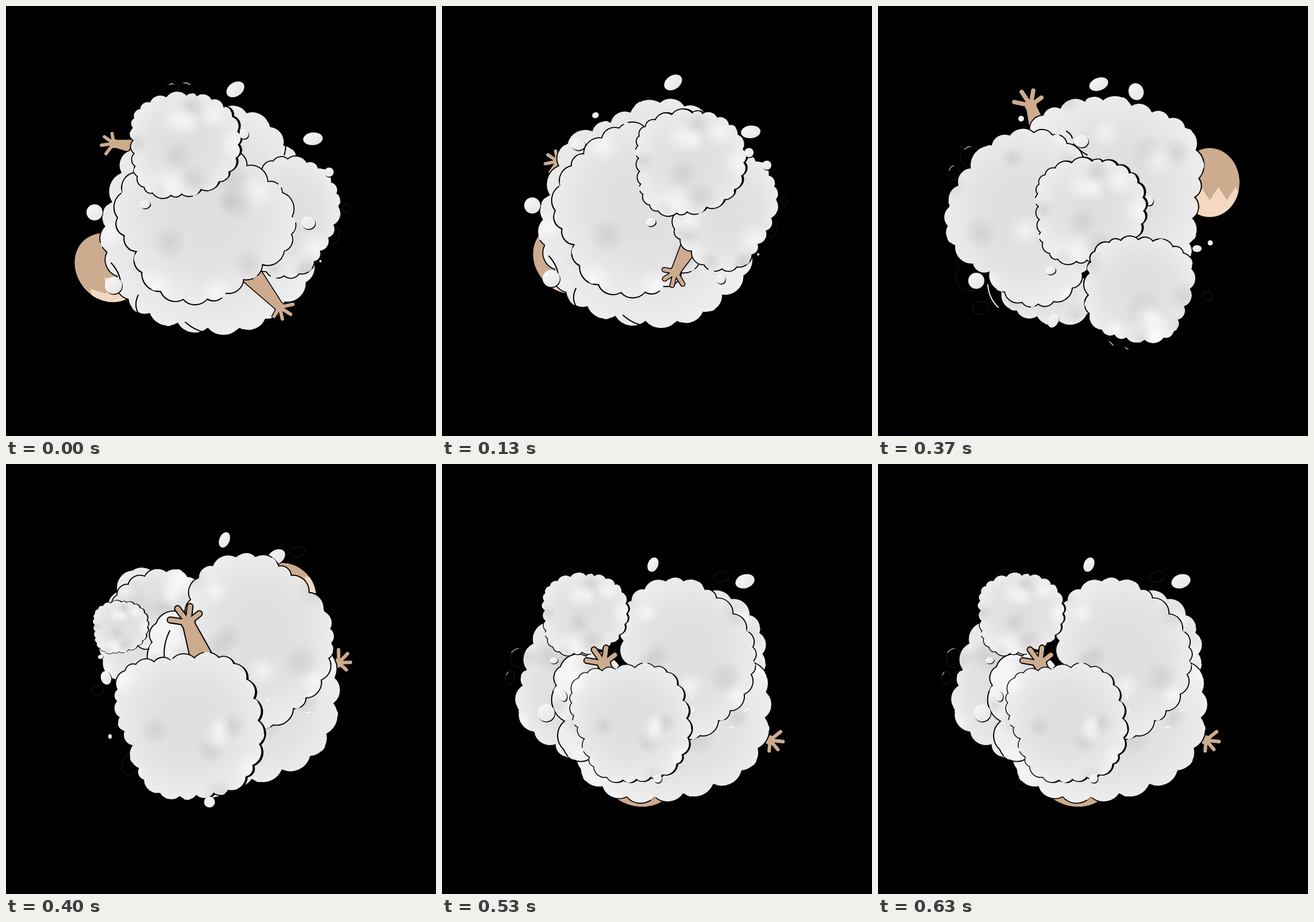
These frames come from a looping animation (748x748 px, 660 ms). An HTML page:

```html
<!DOCTYPE html>
<html lang="en">
<head>
<meta charset="utf-8">
<title>Dust cloud scuffle</title>
<style>
html, body { margin: 0; width: 100%; height: 100%; overflow: hidden; background: #000; }
svg { display: block; width: 100%; height: 100%; }
</style>
</head>
<body>
<svg id="stage" viewBox="0 0 748 748">
  <defs>
    <radialGradient id="puff" cx=".5" cy=".48" r=".62">
      <stop offset="0" stop-color="#dedede"/>
      <stop offset=".5" stop-color="#e2e2e2"/>
      <stop offset=".85" stop-color="#eee"/>
      <stop offset="1" stop-color="#f8f8f8"/>
    </radialGradient>
    <linearGradient id="ball" x2="1" y2="1">
      <stop offset="0" stop-color="#f8f8f8"/>
      <stop offset="1" stop-color="#e4e4e4"/>
    </linearGradient>
    <radialGradient id="dark">
      <stop offset="0" stop-color="#b8b8b8" stop-opacity=".4"/>
      <stop offset="1" stop-color="#b8b8b8" stop-opacity="0"/>
    </radialGradient>
    <radialGradient id="light">
      <stop offset="0" stop-color="#fff" stop-opacity=".6"/>
      <stop offset="1" stop-color="#fff" stop-opacity="0"/>
    </radialGradient>
    <clipPath id="skull"><ellipse rx="52" ry="60"/></clipPath>
  </defs>
</svg>
<script>
const stage = document.getElementById('stage');
const defs = stage.querySelector('defs');
const LOOP = 660;
const SKIN = '#ccab8f', PALE = '#f4d8c2';
const poses = [];

function seeded(seed) {
  let s = seed * 7919 + 17;
  return (lo, hi) => {
    s = (s * 16807) % 2147483647;
    return lo + (hi - lo) * s / 2147483647;
  };
}

// Closed Catmull-Rom curve through the key points.
function loopCurve(keys, fine = 24) {
  const at = i => keys[(i + keys.length) % keys.length];
  const out = [];
  keys.forEach((_, i) => {
    const [a, b, c, d] = [at(i - 1), at(i), at(i + 1), at(i + 2)];
    for (let j = 0; j < fine; j++) {
      const u = j / fine;
      out.push([0, 1].map(n => b[n] + 0.5 * u * (c[n] - a[n]
        + u * (2 * a[n] - 5 * b[n] + 4 * c[n] - d[n] + u * (3 * (b[n] - c[n]) + d[n] - a[n])))));
    }
  });
  return out;
}

// Arcs of random width along the curve, bulging outward.
function scallop(keys, lo, hi, rand) {
  const curve = loopCurve(keys), pts = [curve[0]];
  const dist = (p, q) => Math.hypot(q[0] - p[0], q[1] - p[1]);
  let gap = rand(lo, hi);
  for (const p of curve) {
    if (dist(p, pts[pts.length - 1]) < gap) continue;
    pts.push(p);
    gap = rand(lo, hi);
  }
  if (dist(pts[0], pts[pts.length - 1]) < lo) pts.pop();
  const arcs = pts.map((p, i) => {
    const q = pts[(i + 1) % pts.length], r = 0.66 * dist(p, q);
    return `A${r} ${r} 0 0 1 ${q}`;
  });
  return `M${pts[0]}${arcs.join('')}Z`;
}

function cloud(name, seed, [lo, hi], text, { ink = [1, 0], fill = 'puff' } = {}) {
  const rand = seeded(seed);
  const keys = text.split(' ').map(p => p.split(',').map(Number));
  const d = scallop(keys, lo, hi, rand);
  const range = n => [Math.min(...keys.map(k => k[n])), Math.max(...keys.map(k => k[n]))];
  let spots = '';
  for (let i = 0; i < 10; i++)
    spots += `<circle cx="${rand(...range(0))}" cy="${rand(...range(1))}" r="${rand(20, 36)}" fill="url(#${i % 2 ? 'dark' : 'light'})"/>`;
  defs.innerHTML += `<clipPath id="${name}-clip"><path d="${d}"/></clipPath>
    <g id="${name}"><path d="${d}" transform="translate(${ink})"/>
    <path d="${d}" fill="url(#${fill})"/>
    <g clip-path="url(#${name}-clip)">${spots}</g>
    <path d="${d}" fill="none" stroke="#000" stroke-width="1.8" stroke-dasharray="130 9 60 12" stroke-linecap="round"/></g>`;
}

const put = (markup, x = 0, y = 0, size = 1, turn = 0) =>
  `<g transform="translate(${x} ${y}) rotate(${turn}) scale(${size})">${markup}</g>`;
const use = (name, ...place) => put(`<use href="#${name}"/>`, ...place);

const ball = (x, y, rx, ry = rx, turn = 0) => {
  const e = `<ellipse rx="${rx}" ry="${ry}"`;
  return put(`${e} cx="1" cy="1.5"/>${e} fill="url(#ball)"/>`, x, y, 1, turn);
};
const ghost = (x, y, rx, ry, turn = 0) =>
  put(`<ellipse rx="${rx}" ry="${ry}" stroke="#1d1d1d"/>`, x, y, 1, turn);
const line = (d, color = '#000', w = 2) =>
  `<path d="${d}" fill="none" stroke="${color}" stroke-width="${w}" stroke-linecap="round"/>`;

// Palm at the origin, four fanned fingers, arm below.
function hand(...place) {
  let d = 'M-5 2L5 2L20 105L-20 105Z';
  for (let i = 0; i < 4; i++) {
    const angle = (-64 + 47 * i) * Math.PI / 180, reach = 30 - 2 * i;
    d += `M0 2L${reach * Math.sin(angle)} ${-reach * Math.cos(angle)}`;
  }
  const layer = (color, w) => `<g fill="${color}" stroke="${color}" stroke-width="${w}" stroke-linecap="round"
    stroke-linejoin="round"><path d="${d}"/><circle cy="2" r="7"/></g>`;
  return put(layer('#000', 12) + layer(SKIN, 8), ...place);
}

function head(...place) {
  let hair = 'M-60 70';
  for (let i = 0; i <= 8; i++) hair += `L${-60 + 15 * i} ${i % 2 ? 8 : 31}`;
  return put(`<ellipse rx="53.5" ry="61.5"/><g clip-path="url(#skull)">
    <ellipse rx="52" ry="60" fill="${SKIN}"/><path fill="${PALE}" d="${hair}L60 70Z"/></g>`, ...place);
}

function pose(start, ...parts) {
  const node = document.createElementNS('http://www.w3.org/2000/svg', 'g');
  node.innerHTML = parts.join('');
  stage.append(node);
  poses.push({ start, node });
}

// Cloud shapes
cloud('knot', 3, [16, 34], '222,195 250,167 302,155 360,163 398,200 402,258 374,303 320,324 262,328 230,300 222,245', { ink: [3, -1] });
cloud('back', 5, [34, 55], '200,290 202,260 290,214 370,180 440,195 485,245 525,330 528,465 485,515 430,555 340,560 262,540 214,512 188,455 170,395');
cloud('right', 8, [18, 34], '445,287 490,266 545,283 577,330 570,383 548,425 518,463 460,466 425,430 402,392');
cloud('front', 4, [24, 46], '222,290 245,268 300,226 360,228 430,287 484,328 498,370 487,423 435,457 388,496 335,512 287,504 243,477 226,425 195,380 204,320', { ink: [-1, 1] });
cloud('dome', 6, [28, 50], '264,218 287,190 380,163 470,182 541,218 558,300 546,350 546,400 500,480 330,420', { ink: [1, -1] });
cloud('foot', 2, [30, 50], '214,500 300,440 363,490 356,550 300,546 232,526');
cloud('wing', 7, [26, 46], '197,242 240,222 308,226 348,264 383,340 358,458 308,513 237,511 193,463 149,438 120,380 139,312 168,273');
cloud('corner', 9, [18, 36], '377,427 430,407 500,414 541,441 544,490 522,548 503,576 440,579 377,555 366,500', { ink: [-1, -1] });
cloud('bulk', 11, [24, 46], '321,236 348,184 415,160 468,174 518,214 556,262 566,310 547,378 498,427 455,456 400,430 330,320');
cloud('fist', 12, [20, 40], '193,392 217,352 287,342 373,337 414,367 434,420 441,490 421,538 393,566 287,578 238,548 224,500 199,450', { ink: [3, 1] });
cloud('base', 14, [36, 58], '540,345 564,410 551,492 520,535 465,560 405,576 312,578 273,556 238,510 320,400');
cloud('tail', 15, [26, 44], '460,225 505,235 537,264 556,310 546,370 430,300');
cloud('side', 16, [28, 46], '158,312 173,282 220,279 300,400 240,507 193,486 149,457 133,420 146,360');
cloud('crest', 17, [26, 42], '193,228 226,202 275,187 322,201 340,260 250,320 193,270');
cloud('inner', 18, [30, 50], '199,385 217,344 300,344 310,480 265,513 212,497 213,440', { ink: [-1, 0], fill: 'ball' });

const speck = ball(242, 345, 9, 7, -10);
const knot = (...place) => put('<use href="#knot"/>' + speck, ...place);

// Bits common to the first two poses, which sit slightly apart.
const rear = ghost(572, 400, 8, 15, 20) + ghost(592, 352, 6, 8) + use('back')
  + line('M230 503q-9 18 2 35M312 550q20 18 48 20M484 231q5 13 0 28M183 447q18 20 16 40');
const debris = ball(399, 145, 17, 12, -35) + ball(534, 231, 17, 11, -6) + ball(562, 289, 8)
  + ball(154, 359, 14) + ball(187, 486, 15) + ball(547, 444, 2);

pose(0,
  ghost(290, 146, 16, 10) + ghost(312, 143, 13, 10),
  line('M284 137q4 -3 7 -1M309 134q7 -1 11 3', '#ddd', 1.2),
  hand(186, 239, 0.72, -82), head(178, 455, 1.06, -40),
  rear, use('right'), hand(477, 525, 0.76, 139), use('front'), knot(),
  debris, ball(526, 377, 12, 11), ball(414, 223, 8));

pose(130,
  hand(200, 270, 0.74, -85), head(217, 440, 1.06, -40),
  put(rear + use('front'), 3, -12),
  hand(405, 464, 0.8, 209),
  use('right', 3, -12), knot(121, 31),
  put(debris, 3, -12),
  ball(267, 190, 6, 5, -20), ball(237, 241, 12, 10), ball(534, 255, 8), ball(485, 475, 8));

pose(270,
  ghost(160, 263, 17, 18), ghost(132, 290, 10, 13), ghost(178, 525, 14, 11, -15),
  ghost(573, 505, 9, 8, 30), ghost(412, 582, 11, 9), ghost(160, 470, 24, 26),
  line('M151 249q4 -4 10 -5M124 286q2 -6 7 -8M403 584l6 6M430 594l5 3', '#ddd', 1.2),
  hand(265, 171, 0.94, -18), hand(183, 268, 0.65, -78), head(577, 307),
  ball(384, 136, 17, 11, -20), use('foot'), line('M191 485q2 24 18 39', '#eee'),
  use('dome'), use('wing'),
  ball(354, 235, 12, 11), ball(471, 339, 8), line('M328 218q8 4 10 12M340 240q16 16 24 19M464 318l-2 9'),
  knot(58, 115), use('corner'),
  ball(449, 149, 13, 15, -20), ball(249, 196, 5), ball(171, 478, 14),
  ball(305, 547, 9, 13, 25), ball(578, 412, 4.5), ball(555, 422, 8, 6));

pose(400,
  ghost(507, 153, 13, 9, -10), ghost(159, 394, 11, 8), ghost(215, 525, 14, 18),
  line('M198 198l5 -1M226 182q5 -2 9 0', '#ccc', 1.2),
  head(488, 222, 0.9, -50), hand(580, 345, 0.74, 60), ball(470, 162, 17, 12, -35),
  ball(360, 570, 24, 10, -10), use('base', 8, -25), use('side', 35, -90), use('crest'),
  use('inner', 55, -75), line('M285 290Q272 315 276 342'),
  use('bulk'), line('M456 408l-2 6M524 403l8 -5M520 433l9 -1', '#fff', 1.5),
  knot(43.5, 163, 0.5), hand(316, 274, 1.02, -21), use('fist'),
  ball(380, 132, 9, 14, 22), ball(174, 372, 9, 12, -15), ball(354, 588, 9.5), ball(181, 474, 3, 4));

pose(530,
  ghost(486, 196, 13, 9, -10), ghost(132, 337, 13, 17), ghost(118, 371, 8, 12),
  ghost(250, 555, 9, 12, 20), ghost(222, 195, 16, 12),
  line('M121 328q6 -7 12 -7M112 367l3 -5', '#ccc', 1.2),
  head(342, 537, 1.12, 110), hand(572, 481, 0.76, 112), ball(527, 204, 17, 12, -18),
  use('tail'), use('base'), use('side'), use('inner'),
  use('bulk', 21, 55, 0.92), line('M432 400l3 9M438 424l-2 7M526 430l8 -4M500 458l9 -1', '#fff', 1.5),
  ball(181, 433, 15), knot(5.7, 72.6, 0.78), hand(281, 345, 0.98, -20),
  use('fist', 70, 81, 0.81),
  ball(367, 175, 9, 13, 22), ball(210, 403, 7, 10, -15), ball(375, 547, 7.5));

// Each pose holds until the next one begins.
function render(now) {
  const t = now % LOOP;
  const live = poses.filter(p => p.start <= t).pop();
  for (const p of poses) p.node.style.display = p === live ? '' : 'none';
}

const start = performance.now();
function tick() {
  render(Math.max(0, performance.now() - start));
  requestAnimationFrame(tick);
}
tick();
</script>
</body>
</html>
```
